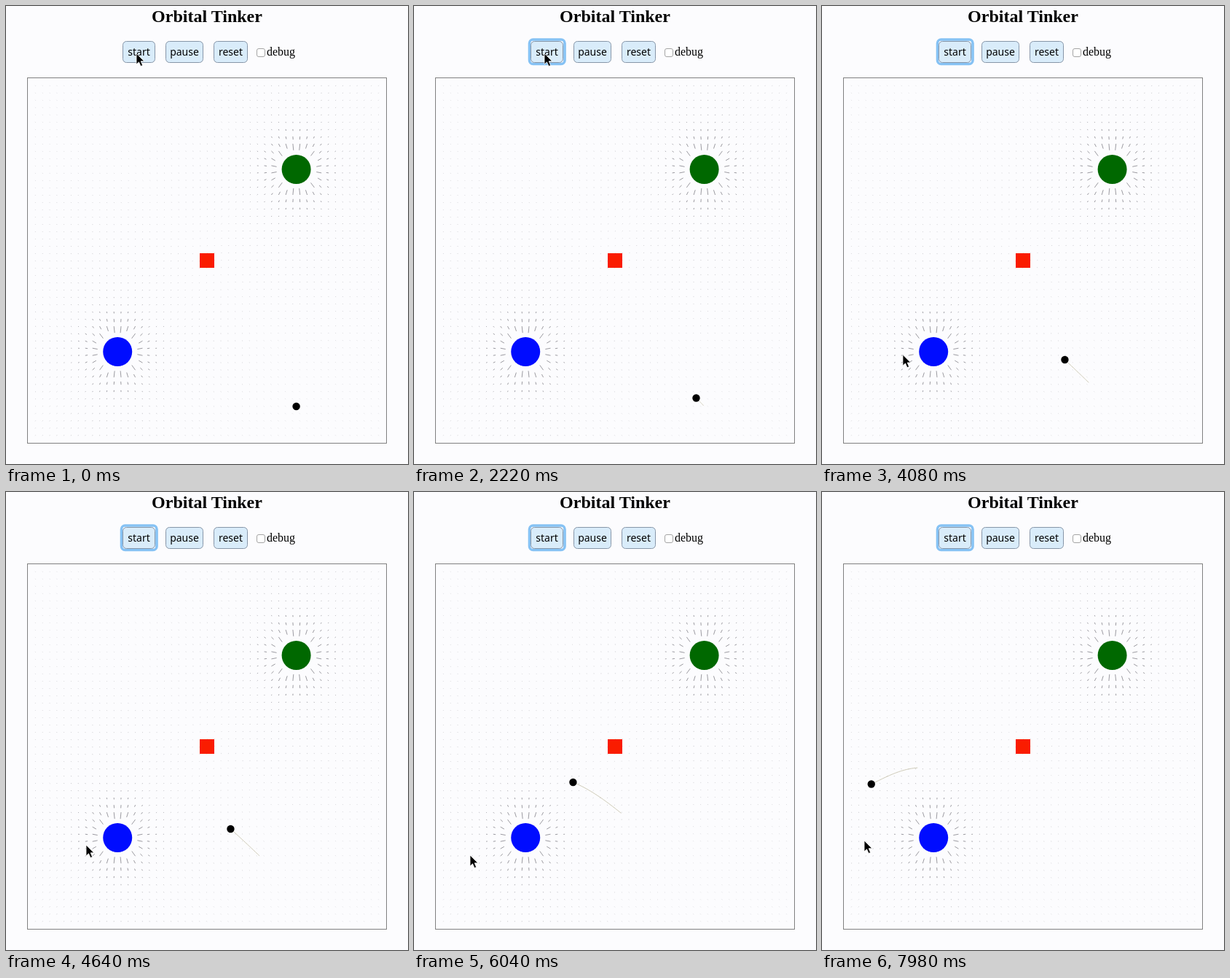
These frames come from a looping animation (552x628 px, 8000 ms). An HTML page:

```html
<!DOCTYPE html>
<html lang="en">
<head>
<meta charset="utf-8">
<title>Orbital Tinker</title>
<style>
  html, body { margin: 0; width: 100%; height: 100%; overflow: hidden; background: #fcfcfe; }
  svg { display: block; width: 552px; height: 628px; }
  .serif { font-family: "Liberation Serif", "Times New Roman", serif; }
  .label { font: 14px "Noto Sans", "Open Sans", sans-serif; text-anchor: middle; }
</style>
</head>
<body>
<svg id="stage" viewBox="0 0 552 628">
  <text class="serif" x="276" y="22" font-size="24" font-weight="bold" text-anchor="middle">Orbital Tinker</text>
  <rect id="focus" x="158.5" y="46" width="48.5" height="33.5" rx="5" fill="none" stroke="#86c2f4" stroke-width="3.6"/>
  <g id="buttons"></g>
  <rect x="344.5" y="58.5" width="11" height="11" rx="2.5" fill="#fff" stroke="#a4a4a4"/>
  <text class="serif" x="358" y="68" font-size="16">debug</text>
  <rect x="29.5" y="98.5" width="493" height="501" fill="none" stroke="#808080"/>
  <g id="field"></g>
  <circle cx="398.6" cy="224" r="20" fill="#006800"/>
  <circle cx="153.2" cy="474" r="20" fill="#000cff"/>
  <rect x="266" y="339" width="20" height="20" fill="#fa1c00"/>
  <polyline id="trail" fill="none" stroke="#cfcbb8"/>
  <circle id="ball" r="5.2"/>
  <path id="cursor" d="M0 0V15L3.5 11.8L6 17.5L8.6 16.4L6.2 10.8H10.8Z" stroke="#fff" stroke-width=".8"/>
</svg>
<script>
const LOOP = 8000, START = 920, TRAIL = 950;
const $ = id => document.getElementById(id);

function add(parent, tag, attrs, text) {
  const el = document.createElementNS("http://www.w3.org/2000/svg", tag);
  for (const k in attrs) el.setAttribute(k, attrs[k]);
  if (text) el.textContent = text;
  parent.appendChild(el);
}

function drawButtons() {
  for (const [label, x, w] of [["start", 160, 45], ["pause", 219, 52], ["reset", 285, 47]]) {
    add($("buttons"), "rect", { x: x + .5, y: 48.5, width: w - 1, height: 29, rx: 5, fill: "#d9ecfa", stroke: "#8796a8" });
    add($("buttons"), "text", { x: x + w / 2, y: 68, class: "label" }, label);
  }
}

// Pull of both planets with a steep falloff, sampled on a 50 by 50 grid
function drawField() {
  const planets = [[398.6, 224], [153.2, 474]];
  for (let i = 1; i < 50; i++) for (let j = 1; j < 50; j++) {
    const x = 30.2 + i * 9.83, y = 98.8 + j * 10.01;
    let fx = 0, fy = 0, near = 1e9;
    for (const [px, py] of planets) {
      const dx = px - x, dy = py - y, r = Math.hypot(dx, dy);
      near = Math.min(near, r);
      fx += 4e5 * dx / r ** 4;
      fy += 4e5 * dy / r ** 4;
    }
    if (near < 30) continue;
    fx *= .75;
    const f = Math.hypot(fx, fy), len = Math.max(1.2, f);
    const ux = f ? fx / f : 1, uy = f ? fy / f : 0;
    const alpha = Math.min(1, .24 + .5 * Math.sqrt(f));
    add($("field"), "path", {
      d: `M${x.toFixed(1)} ${y.toFixed(1)}l${(ux * len).toFixed(2)} ${(uy * len).toFixed(2)}`,
      stroke: "#908f96", "stroke-opacity": alpha.toFixed(2), "stroke-width": .9
    });
  }
}

// Keys are [time, x, y]; the outer two only shape the end tangents
const flight = [
  [-380, 387.5, 537.5], [START, 398.6, 549], [2220, 387.5, 537.5], [3520, 354, 504.5],
  [4640, 308.5, 462], [5100, 284, 440], [6040, 218.5, 398], [6880, 143, 378],
  [7980, 67.8, 400.5], [8800, 22, 430]
];
const pointer = [
  [3560, 179, 65], [4120, 110, 484], [4640, 110, 484],
  [6040, 77, 498], [6880, 58, 456], [7980, 58, 478]
];

function slope(keys, i, c) {
  const [a, b, d] = [keys[i - 1], keys[i], keys[i + 1]];
  const h = b[0] - a[0], k = d[0] - b[0];
  return ((b[c] - a[c]) / h * k + (d[c] - b[c]) / k * h) / (h + k);
}

function ballAt(t) {
  t = Math.max(START, t);
  let i = 1;
  while (i < flight.length - 3 && t > flight[i + 1][0]) i++;
  const a = flight[i], b = flight[i + 1], h = b[0] - a[0], u = (t - a[0]) / h, v = 1 - u;
  return [1, 2].map(c =>
    v * v * (1 + 2 * u) * a[c] + u * u * (3 - 2 * u) * b[c] +
    h * u * v * (v * slope(flight, i, c) - u * slope(flight, i + 1, c)));
}

function pointerAt(t) {
  const n = pointer.findIndex(k => k[0] > t);
  if (n < 1) return pointer[n ? pointer.length - 1 : 0].slice(1);
  const a = pointer[n - 1], b = pointer[n], u = (t - a[0]) / (b[0] - a[0]), s = u * u * (3 - 2 * u);
  return [1, 2].map(c => a[c] + (b[c] - a[c]) * s);
}

function render(t) {
  const at = p => `translate(${p[0].toFixed(2)} ${p[1].toFixed(2)})`;
  $("ball").setAttribute("transform", at(ballAt(t)));
  $("cursor").setAttribute("transform", at(pointerAt(t)));
  $("focus").style.display = t < 860 ? "none" : "";
  const pts = Array.from({ length: 25 }, (_, i) => ballAt(t - TRAIL * i / 24).map(v => v.toFixed(2)).join());
  $("trail").setAttribute("points", pts.join(" "));
}

drawButtons();
drawField();
render(0);
const begin = performance.now();
(function tick() {
  render((performance.now() - begin) % LOOP);
  requestAnimationFrame(tick);
})();
</script>
</body>
</html>
```
